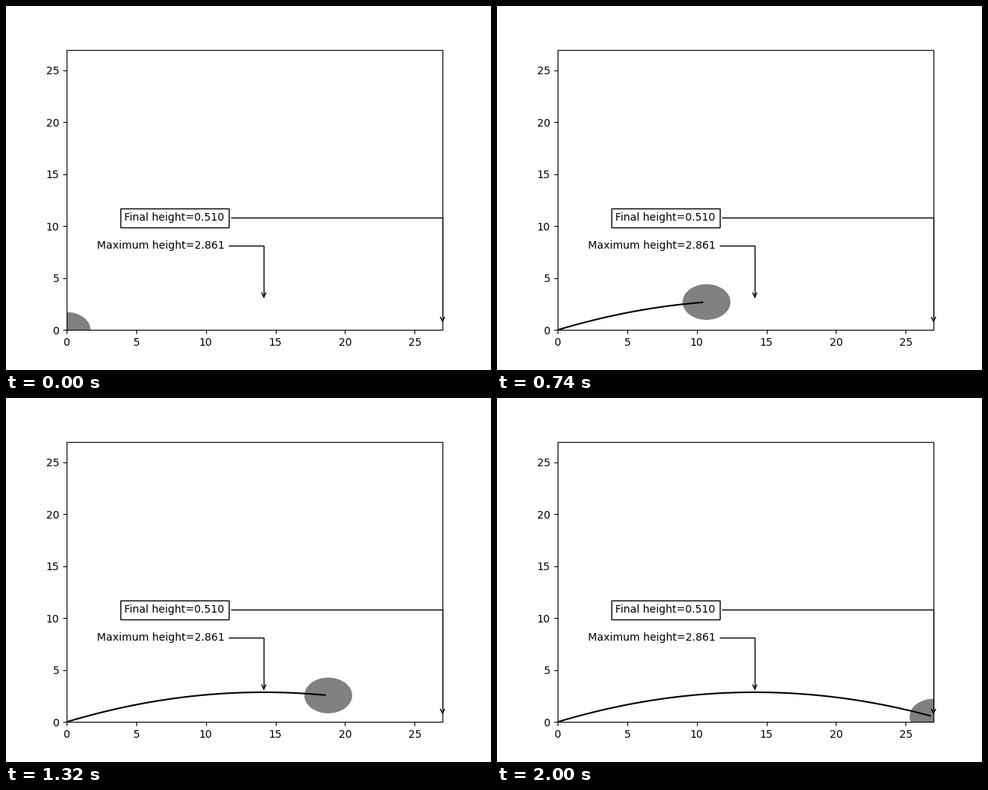
These frames come from a looping animation (640x480 px, 2.02 s). A matplotlib script:

```python
import numpy as np
import matplotlib.pyplot as plt
from matplotlib.animation import FuncAnimation
from matplotlib.patches import Circle

G = 9.81
SPEED = 20
ANGLE = np.radians(22)
X_END = 27


def height(x):
    drop = G * x**2 / (2 * (SPEED * np.cos(ANGLE))**2)
    return x * np.tan(ANGLE) - drop


x_peak = SPEED**2 * np.sin(2 * ANGLE) / (2 * G)

# Quicker steps on the rise, then a short skip and slower steps on the fall.
xs = np.concatenate([np.linspace(0, x_peak, 50),
                     np.linspace(x_peak + 0.77, X_END, 51)])
ys = height(xs)

fig, ax = plt.subplots(figsize=(6.4, 4.8), dpi=100)
ax.set(xlim=(0, X_END), ylim=(0, X_END))

ball = ax.add_patch(Circle((0, 0), 1.72, facecolor="gray", edgecolor="none"))
path, = ax.plot([], [], color="black", lw=1.5)


def label(name, x, level, **kwargs):
    ax.annotate(f"{name} height={height(x):.3f}",
                xy=(x, height(x)), xytext=(0.42, level),
                textcoords="axes fraction", ha="right", va="center",
                annotation_clip=False,
                arrowprops=dict(arrowstyle="->",
                                connectionstyle="angle,angleA=0,angleB=90"),
                **kwargs)


label("Maximum", x_peak, 0.3)
label("Final", X_END, 0.4, bbox=dict(facecolor="white", edgecolor="black"))


def update(i):
    ball.center = xs[i], ys[i]
    path.set_data(xs[:i], ys[:i])
    return ball, path


anim = FuncAnimation(fig, update, frames=len(xs), interval=20, repeat=True)
plt.show()
```
